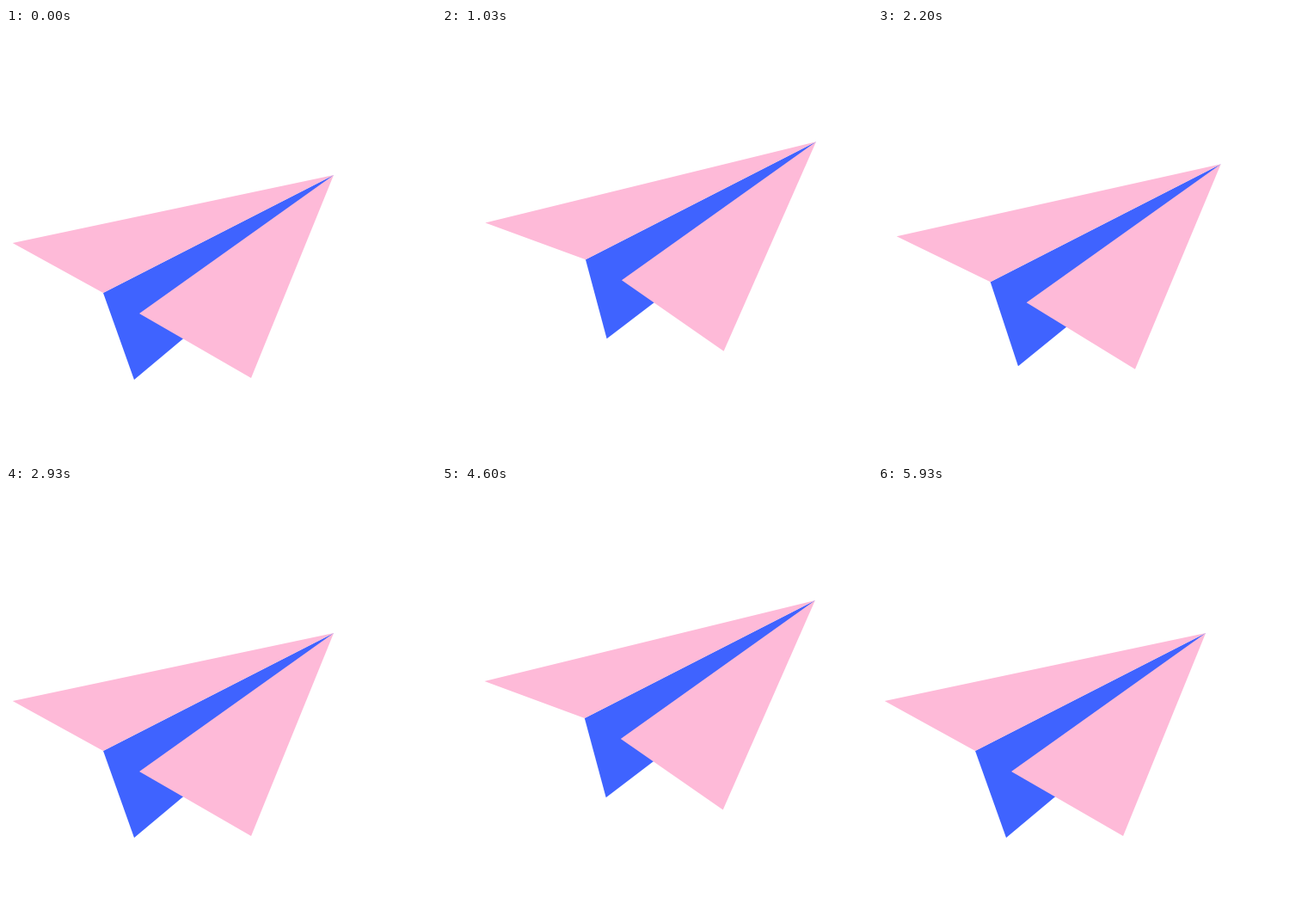
Animation, 500 px wide and 500 px high, one loop 6.01 s. Source, as an HTML page:

```html
<!DOCTYPE html>
<html>
<head>
<meta charset="utf-8">
<style>
html, body { margin: 0; width: 100%; height: 100%; overflow: hidden; background: #fff; }
svg { display: block; width: 100%; height: 100%; }
</style>
</head>
<body>
<svg viewBox="0 0 500 500">
  <polygon id="body" fill="#3f63ff"/>
  <polygon id="far" fill="#febad8"/>
  <polygon id="near" fill="#febad8"/>
</svg>
<script>
const LOOP = 6010, CYCLE = 3000, RISE = 1350;

// Each corner: resting x, y and its travel dx, dy at the top of the glide
const corners = {
  tip: [381, 171, 57, -41],
  left: [7.7, 250, 45, -24.7],
  fold: [113, 308, 57, -41],
  keel: [149, 409, 45, -50.5],
  hidden: [229, 342, 45, -44],
  inner: [155, 332, 57, -41],
  right: [285, 407, 45, -33]
};
const shapes = {
  body: ['fold', 'tip', 'hidden', 'keel'],
  far: ['left', 'tip', 'fold'],
  near: ['inner', 'tip', 'right']
};

// Cubic-bezier(.345, 0, .4, 1)
function ease(x) {
  let lo = 0, hi = 1, s;
  for (let i = 0; i < 24; i++) {
    s = (lo + hi) / 2;
    const r = 1 - s;
    if (3 * r * s * (r * .345 + s * .4) + s ** 3 < x) lo = s; else hi = s;
  }
  return s * s * (3 - 2 * s);
}

function lift(t) {
  return t < RISE ? ease(t / RISE) : 1 - ease((t - RISE) / (CYCLE - RISE));
}

// Twenty poses a second, held alternately for 30 and 70 ms
function poseTime(t) {
  t = Math.min(t % LOOP, 5999);
  return Math.floor(t / 100) * 100 + (t % 100 >= 30 ? 50 : 0);
}

function draw(t) {
  const p = lift(poseTime(t) % CYCLE);
  for (const id in shapes) {
    const points = shapes[id].map(name => {
      const [x, y, dx, dy] = corners[name];
      return (x + dx * p).toFixed(2) + ',' + (y + dy * p).toFixed(2);
    });
    document.getElementById(id).setAttribute('points', points.join(' '));
  }
}

const start = performance.now();
function tick() {
  draw(performance.now() - start);
  requestAnimationFrame(tick);
}
tick();
</script>
</body>
</html>
```
